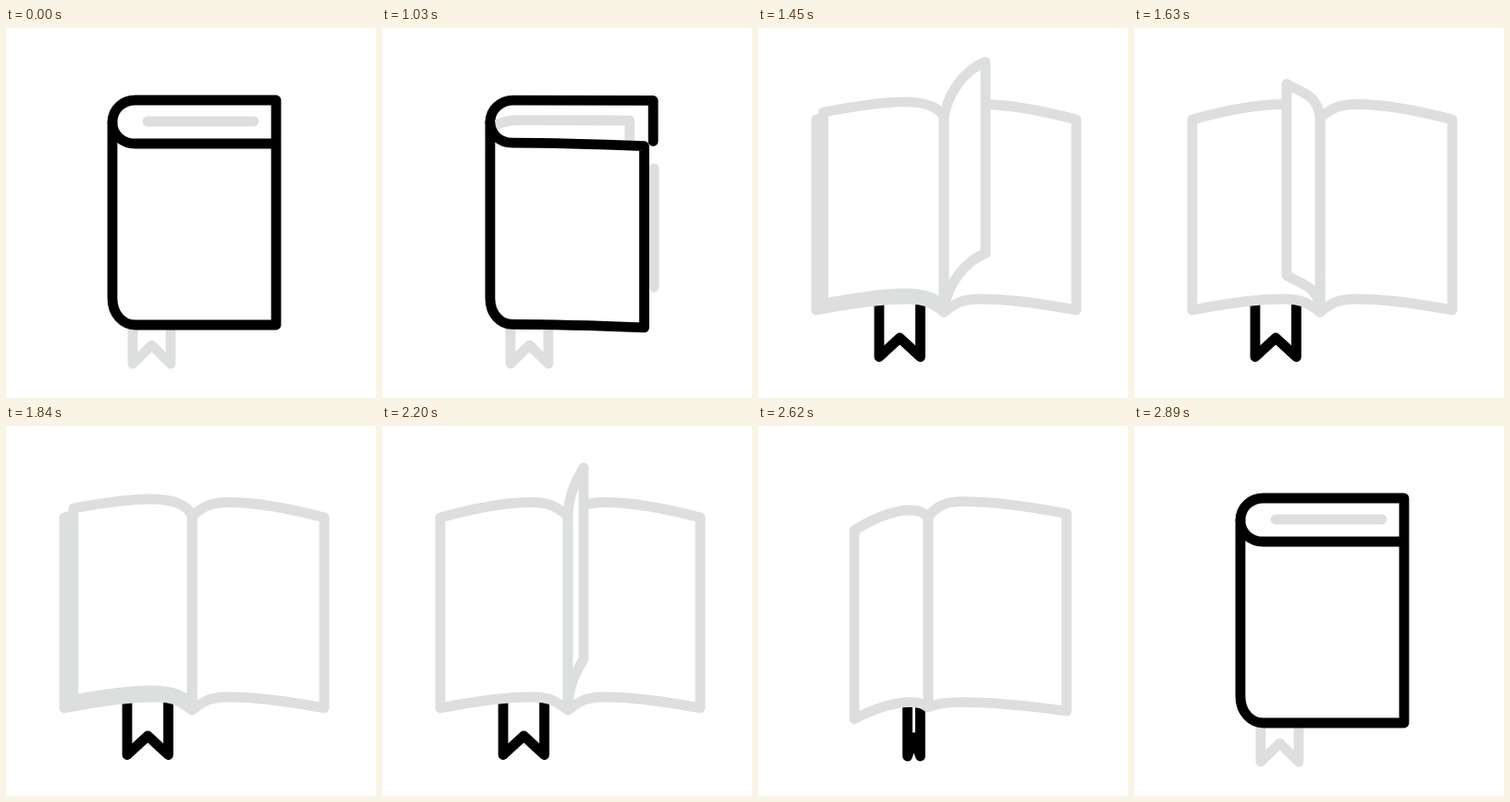
Animation of 400 by 400 pixels, one loop 2.92 s. Source, as an HTML page with a canvas:

```html
<!DOCTYPE html>
<html lang="en">
<head>
<meta charset="utf-8">
<title>Book</title>
<style>
html, body { margin: 0; width: 100%; height: 100%; overflow: hidden; background: #fff; }
canvas { display: block; width: 400px; height: 400px; }
</style>
</head>
<body>
<canvas id="stage" width="400" height="400"></canvas>
<script>
const ctx = document.getElementById('stage').getContext('2d');
const LOOP = 2920, HOLD = 1030, STEP = 30;
const OPEN_AT = 990, CLOSE_AT = 2500, SWING = 380;
const RISE = 170, LAND = 55;
const INK = '#000', GREY = '#dcdfde';

const HINGE = { x: 201, y: 97, height: 207 };
const PAGES = [
  { start: 1110, fall: 150 },
  { start: 1260, fall: 400 },
  { start: 1960, fall: 340 }
];
// Stops of a turning page's upper corner.
const TIPS = [[344, 99], [255, 34], [75, 87], [63, 98]];

const clamp = (v) => Math.max(0, Math.min(1, v));
const lerp = (a, b, t) => a + (b - a) * t;
const ease = (p) => p < 0.5 ? 2 * p * p : 1 - 2 * (1 - p) ** 2;

function swing(t) {
  return t < CLOSE_AT ? clamp((t - OPEN_AT) / SWING) : 1 - clamp((t - CLOSE_AT) / SWING);
}

// A curve rises from the spine to a knee, then runs to the outer corner.
function edge(s, x, y, knee, kneeY, span, endY) {
  return { s, x, y, kx: x + knee, ky: kneeY, ex: x + span, ey: endY };
}

function handles(e) {
  return [
    [lerp(e.x, e.kx, 0.3 * e.s), lerp(e.y, e.ky, 0.6)],
    [lerp(e.x, e.kx, 0.45), e.ky],
    [lerp(e.kx, e.ex, 0.4), e.ky]
  ];
}

function outward(path, e) {
  const [a, b, c] = handles(e);
  path.moveTo(e.x, e.y);
  path.bezierCurveTo(...a, ...b, e.kx, e.ky);
  path.quadraticCurveTo(...c, e.ex, e.ey);
}

function inward(path, e) {
  const [a, b, c] = handles(e);
  path.lineTo(e.ex, e.ey);
  path.quadraticCurveTo(...c, e.kx, e.ky);
  path.bezierCurveTo(...b, ...a, e.x, e.y);
}

// One half of the book; turn is 1 facing right and -1 facing left.
function makeLeaf(s, spine, shutTop, openSpan, turn) {
  const span = lerp(177, openSpan, s) * turn;
  const knee = lerp(25, 39, s) * turn;
  const dip = 10 * Math.sqrt(1 - turn * turn);
  const top = edge(s, spine, lerp(102, HINGE.y, s), knee, lerp(shutTop, 82.5, s),
    span, lerp(shutTop, 99, s) + dip);
  const low = edge(s, spine, lerp(292, 307, s), knee, lerp(321, 293, s),
    span, lerp(321, 305, s) + dip);
  const path = new Path2D();
  outward(path, top);
  inward(path, low);
  path.closePath();
  return { top, path };
}

function paint(path, color, filled) {
  if (filled) {
    ctx.fillStyle = '#fff';
    ctx.fill(path);
  }
  ctx.strokeStyle = color;
  ctx.stroke(path);
}

function line(...points) {
  const path = new Path2D();
  points.forEach(([x, y]) => path.lineTo(x, y));
  return path;
}

function drawBookmark(s, spine) {
  const w = s * s;
  const a = spine + lerp(63, -70, w), b = spine + lerp(22, -25.5, w);
  const top = lerp(321, 300, s), end = lerp(363, 355.5, s), notch = lerp(343, 335, s);
  const path = line([a, top], [a, end], [(a + b) / 2, notch], [b, end], [b, top]);
  paint(path, a < b ? INK : GREY);
}

function drawBack(s, leaf, turned) {
  const { ex, ey } = leaf.top;
  if (s > 0.04) {
    paint(leaf.path, GREY, true);
  } else if (s > 0) {
    const half = 2900 * s;
    paint(line([ex + 1, 216 - half], [ex + 1, 216 + half]), GREY);
  }
  if (turned) return;
  const rim = new Path2D();
  outward(rim, leaf.top);
  rim.lineTo(ex, ey + 45 * (1 - s));
  paint(rim, INK);
}

function drawInner(s, spine) {
  if (s === 0) {
    paint(line([153, 101], [268, 101]), GREY);
    return;
  }
  const e = edge(s, spine, lerp(114, HINGE.y, s), lerp(32, 39, s), lerp(100, 82.5, s),
    lerp(151, 143, s), lerp(100, 99, s));
  const path = new Path2D();
  outward(path, e);
  path.lineTo(e.ex, 302);
  paint(path, GREY);
}

function turnPhase({ start, fall }, t) {
  const d = t - start;
  const rise = Math.sin(clamp(d / RISE) * Math.PI / 2);
  return rise + clamp((d - RISE) / fall) + clamp((d - RISE - fall) / LAND);
}

function drawPage(q, spine) {
  if (q <= 0 || q >= 3) return;
  const k = Math.floor(q);
  const [x, y] = TIPS[k].map((v, i) => lerp(v, TIPS[k + 1][i], q - k));
  const bend = 20 - 36 * Math.abs(x - HINGE.x) / 143;
  const a = [lerp(HINGE.x, x, 0.08), 72], b = [lerp(HINGE.x, x, 0.48), y + bend];
  const lower = ([px, py]) => [px, py + HINGE.height];
  const path = new Path2D();
  path.moveTo(HINGE.x, HINGE.y);
  path.bezierCurveTo(...a, ...b, x, y);
  path.lineTo(...lower([x, y]));
  path.bezierCurveTo(...lower(b), ...lower(a), ...lower([HINGE.x, HINGE.y]));
  path.closePath();
  ctx.save();
  ctx.translate(spine - HINGE.x, 0);
  paint(path, GREY, true);
  ctx.restore();
}

function draw(t) {
  const p = swing(t), s = ease(p);
  const spine = lerp(115, HINGE.x, s);
  const turned = p > 0.5;
  const back = makeLeaf(s, spine, 78, 143, 1);
  const cover = makeLeaf(s, spine, 125, 138, Math.cos(Math.PI * p));

  ctx.clearRect(0, 0, 400, 400);
  ctx.lineWidth = 10.8;
  ctx.lineCap = ctx.lineJoin = 'round';

  drawBookmark(s, spine);
  drawBack(s, back, turned);
  if (turned) paint(cover.path, GREY, true);
  else drawInner(s, spine);
  PAGES.forEach((page) => drawPage(turnPhase(page, t), spine));
  if (!turned) paint(cover.path, INK, true);
}

function frame() {
  const t = performance.now() % LOOP;
  draw(t < HOLD ? 0 : HOLD + Math.floor((t - HOLD) / STEP) * STEP);
  requestAnimationFrame(frame);
}
frame();
</script>
</body>
</html>
```
